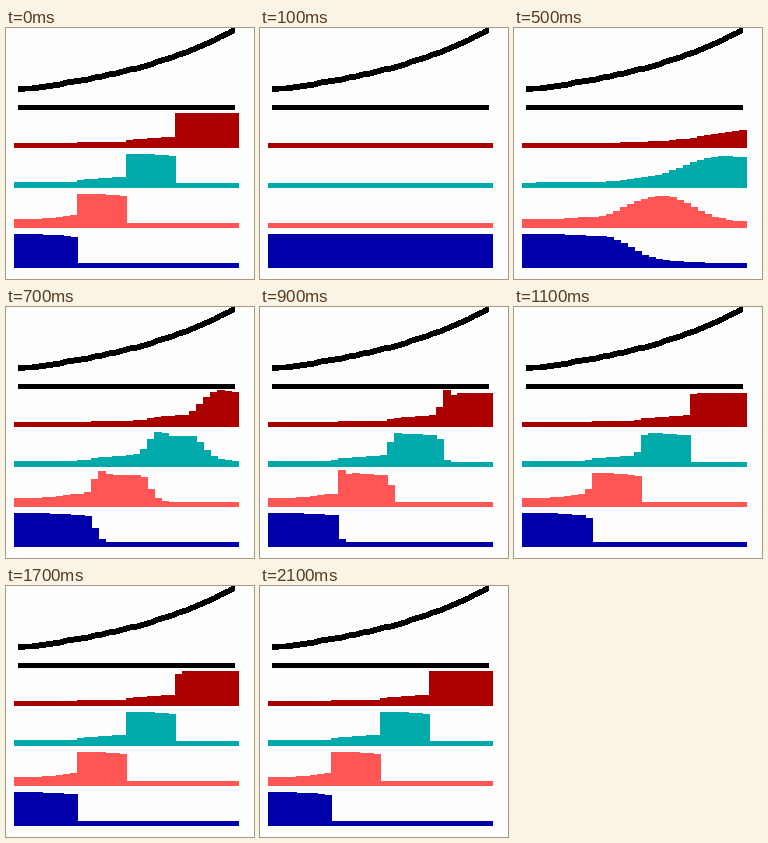
These frames come from a looping animation (248x251 px, 2.4 s). A matplotlib script:

```python
import numpy as np
import matplotlib.pyplot as plt
from matplotlib.animation import FuncAnimation
from matplotlib.patches import Rectangle

W, H, DPI = 248, 251, 64
CELLS, STEP, LEFT = 32, 7, 8
FLOOR = 5
FRAMES, INTERVAL = 24, 100
COLORS = ["#0000aa", "#ff5555", "#00aaaa", "#aa0000"]
BASELINES = [240, 200, 160, 120]

cell = np.arange(CELLS)


def sigmoid(x):
    return 1 / (1 + np.exp(-np.clip(x, -60, 60)))


def switch_time(offset, scale, threshold):
    """Cells close to the threshold linger longest before switching."""
    return offset + scale / np.sqrt(np.maximum(cell - threshold, 0.005))


SWITCHES = [
    switch_time(172, 826, 8.3),
    switch_time(90, 1190, 14.8),
    switch_time(329, 700, 22.65),
]


def rise(q):
    q = q + 2
    return sigmoid(q / np.where(q < 0, 45, 32))


def fall(q):
    return sigmoid((30 - q) / 35)


def overshoot(q, switch):
    damping = np.clip((switch - 300) / 400, 0, 1)
    ring = 4.2 * np.exp(-((q - 95) / 40) ** 2) - 2 * np.exp(-((q - 190) / 45) ** 2)
    return damping * ring


def plateau(start):
    return 29.5 - np.minimum(0.045 * np.maximum(cell - start, 0) ** 2, 2)


def leak(spill, start, upstream):
    """Weak activity: spill-over at first, primed once the gene before is on."""
    primed = np.clip(3.8 + 0.5 * (cell - start), 0, 10)
    return spill * (1 - upstream) + upstream * primed


def levels(t):
    """Gene activity above the floor, one row per gene."""
    if t < 300:
        return np.array([np.full(CELLS, 29.0)] + [np.zeros(CELLS)] * 3)
    lag = [t - s for s in SWITCHES]
    up = [rise(q) for q in lag]
    down = [fall(q) for q in lag]
    extra = [overshoot(q, s) for q, s in zip(lag, SWITCHES)]

    fade = 1 - np.exp(-(t - 100) / 598)
    settle = np.clip((t - 300) / 400, 0, 1)
    pink = 3.75 + 0.011 * cell ** 2 + settle * np.minimum(0.5 + 0.05 * cell ** 2, 4.2)
    teal = leak(0.245 * pink, 9, up[0])
    red = leak(0.27 * teal, 16, up[1])
    leaks = [pink, teal, red]
    tops = [plateau(9), plateau(16), np.full(CELLS, 30.0)]

    rows = [(29.6 - fade * np.minimum(0.0423 * cell ** 2, 23)) * down[0]]
    for k in range(3):
        on = leaks[k] + up[k] * (tops[k] - leaks[k]) + extra[k]
        rows.append(on * (down[k + 1] if k < 2 else 1))
    return np.maximum(rows, 0)


fig = plt.figure(figsize=(W / DPI, H / DPI), dpi=DPI, facecolor="#fdfdfd")
ax = fig.add_axes([0, 0, 1, 1])
ax.set_xlim(0, W)
ax.set_ylim(H, 0)
ax.axis("off")

# Morphogen gradient and its axis, both drawn with an upright 5 px pen
solid = dict(facecolor="black", linewidth=0, antialiased=False)
line_x = 12 + STEP * cell
gradient = np.round(77.7 - 16.4 * np.exp(0.77 * (line_x - 12) / 108.5))
ax.fill_between(line_x, gradient - 2, gradient + 3, **solid)
ax.add_patch(Rectangle((12, 77), 217, 5, **solid))

bars = []
for color, base in zip(COLORS, BASELINES):
    row = [Rectangle((LEFT + STEP * i, base - FLOOR), STEP + 1, FLOOR,
                     facecolor=color, linewidth=0, antialiased=False)
           for i in cell]
    for bar in row:
        ax.add_patch(bar)
    bars.append(row)


def draw(frame):
    # The loop opens on the settled pattern, then starts over.
    t = min(frame * INTERVAL, 2100) if frame else 2100
    heights = FLOOR + np.floor(levels(t) + 1e-6)
    for row, base, hs in zip(bars, BASELINES, heights):
        for bar, h in zip(row, hs):
            bar.set_y(base - h)
            bar.set_height(h)
    return [bar for row in bars for bar in row]


anim = FuncAnimation(fig, draw, frames=FRAMES, interval=INTERVAL,
                     repeat=True, repeat_delay=0, blit=False)
plt.show()
```
